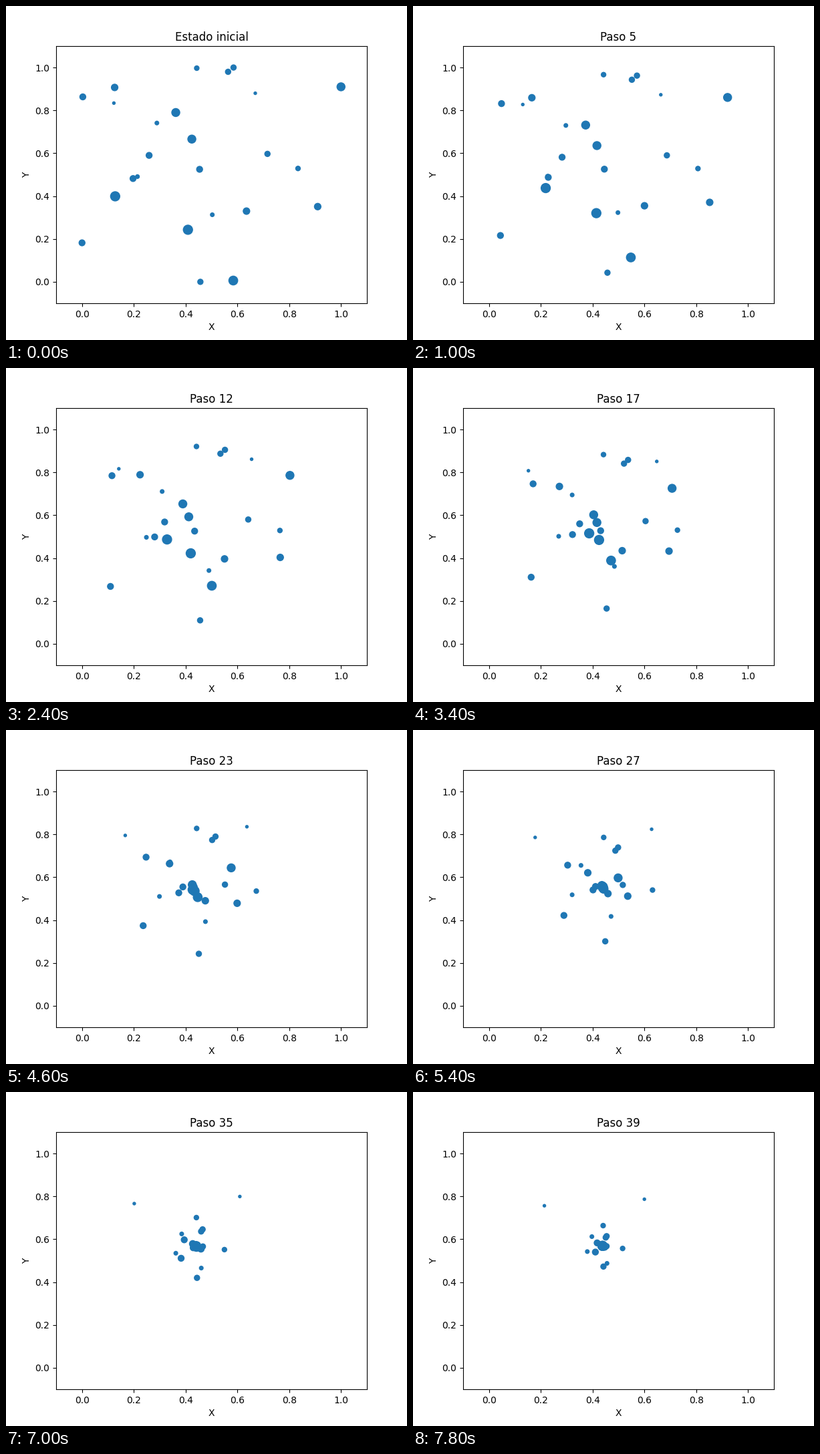
These frames come from a looping animation (600 by 500 pixels, 8 s). A matplotlib script:

```python
import numpy as np
import matplotlib.pyplot as plt
from matplotlib.animation import FuncAnimation

STEPS = 40
PULL = 0.00232      # strength of the attraction
SOFT = 0.03         # keeps the pull finite at short range
FALLOFF = 0.75
HEAVIEST = 12

# starting places of the bodies, grouped by mass
STARTS = {
    1: [(0.123, 0.834), (0.669, 0.880)],
    2: [(0.289, 0.741), (0.214, 0.491), (0.503, 0.313)],
    3: [(0.834, 0.529), (0.443, 0.997)],
    4: [(0.457, 0.000), (0.716, 0.597), (0.585, 1.000), (0.564, 0.980)],
    5: [(0.003, 0.863), (0.259, 0.590), (0.197, 0.482), (0.000, 0.182),
        (0.454, 0.525)],
    6: [(0.126, 0.907), (0.635, 0.330), (0.910, 0.351)],
    9: [(0.362, 0.790), (0.424, 0.666), (1.000, 0.910)],
    11: [(0.584, 0.006)],
    12: [(0.128, 0.399), (0.409, 0.243)],
}
START = np.array([spot for group in STARTS.values() for spot in group])
MASS = np.repeat(list(STARTS), [len(g) for g in STARTS.values()]) / HEAVIEST


def advance(pos, step):
    """Move every body along the softened pull of all the others."""
    gap = pos[None, :, :] - pos[:, None, :]
    dist2 = (gap ** 2).sum(axis=2)
    gain = PULL * (1 + 0.25 * np.clip((step - 12) / 12, 0, 1))
    weight = gain * np.outer(MASS, MASS) / (dist2 + SOFT) ** FALLOFF
    return pos + (weight[:, :, None] * gap).sum(axis=1)


path = [START]
for step in range(1, STEPS):
    path.append(advance(path[-1], step))

fig, ax = plt.subplots(figsize=(6, 5), dpi=100)
dots = ax.scatter(*START.T, s=100 * MASS)
ax.set(xlim=(-0.1, 1.1), ylim=(-0.1, 1.1), xlabel="X", ylabel="Y")
title = ax.set_title("Estado inicial")


def draw(step):
    dots.set_offsets(path[step])
    title.set_text(f"Paso {step}" if step else "Estado inicial")
    return dots, title


anim = FuncAnimation(fig, draw, frames=STEPS, interval=200,
                     repeat=True, repeat_delay=0)
plt.show()
```
